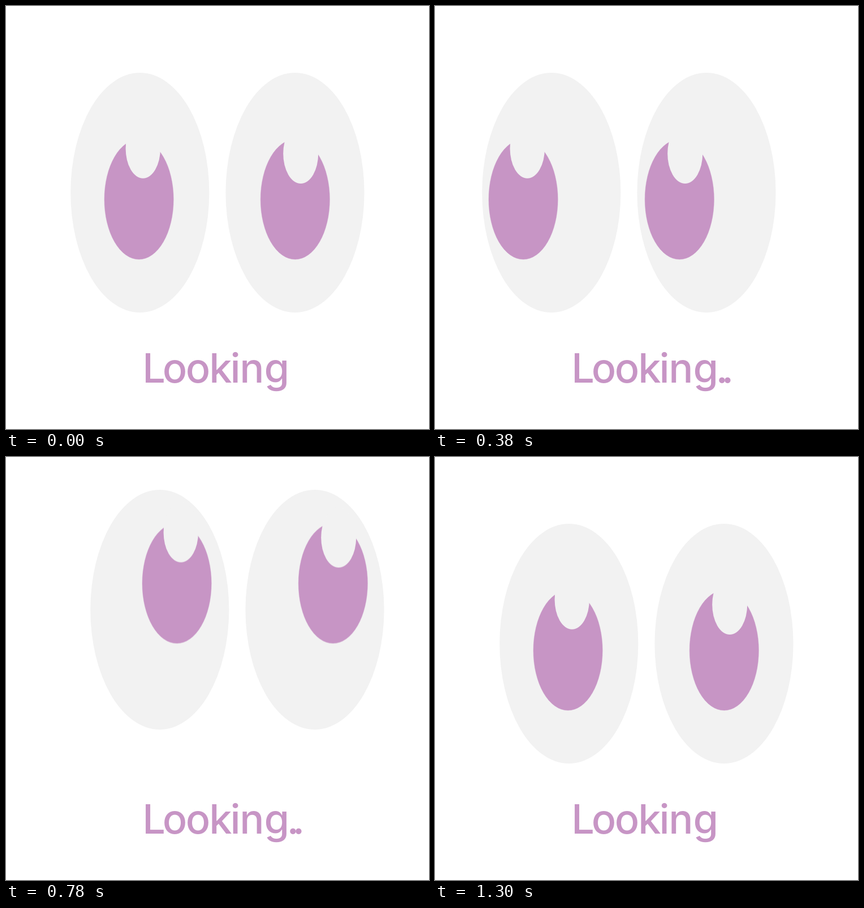
An HTML page for the animation above (1.5 s loop, 748 by 748 pixels).

```html
<!DOCTYPE html>
<html lang="en">
<head>
<meta charset="utf-8">
<title>Looking</title>
<style>
  html, body { margin: 0; width: 100%; height: 100%; overflow: hidden; background: #fff; }
  svg { display: block; width: 100vw; height: 100vh; }

  .white, .glint { fill: #f2f2f2; }
  .iris, text { fill: #c795c5; }
  .iris { stroke: #c795c5; stroke-opacity: .45; }
  text { font: 500 72px Inter, "Noto Sans", sans-serif; text-anchor: middle; }

  .eyes, .pupils, .dot { animation: 1.5s step-end infinite; }
  .eyes { animation-name: eyes; }
  .pupils { animation-name: pupils; }
  .d1 { animation-name: dot1; }
  .d2 { animation-name: dot2; }
  .d3 { animation-name: dot3; }

  @keyframes eyes {
    0%, 66.66%, 100% { transform: translate(0, 0); }
    6.66%  { transform: translate(-17.5px, 0); }
    13.33% { transform: translate(-31px, 0); }
    33.33% { transform: translate(0, -25px); }
    40%    { transform: translate(35px, -60px); }
    60%    { transform: translate(14.7px, -38px); }
  }
  @keyframes pupils {
    0%, 66.66%, 100% { transform: translate(0, 0); }
    6.66%  { transform: translate(-47px, 0); }
    13.33% { transform: translate(-79px, 0); }
    33.33% { transform: translate(-12px, -54px); }
    40%    { transform: translate(67px, -118.5px); }
    60%    { transform: translate(30.7px, -70px); }
  }
  @keyframes dot1 { 0%, 60%, 100% { opacity: 0; } 6.66% { opacity: 1; } }
  @keyframes dot2 { 0%, 60%, 100% { opacity: 0; } 13.33% { opacity: 1; } }
  @keyframes dot3 { 0%, 40%, 100% { opacity: 0; } 33.33% { opacity: 1; } }
</style>
</head>
<body>
<svg viewBox="0 0 748 748">
  <g class="eyes">
    <ellipse class="white" cx="236.8" cy="330" rx="122.6" ry="212"/>
    <ellipse class="white" cx="511" cy="330" rx="122.6" ry="212"/>
  </g>
  <g class="pupils">
    <ellipse class="iris" cx="235.1" cy="342" rx="61.1" ry="106"/>
    <ellipse class="glint" cx="242.3" cy="252" rx="30.7" ry="52.7"/>
    <ellipse class="iris" cx="511.3" cy="342" rx="61.1" ry="106"/>
    <ellipse class="glint" cx="521.2" cy="261" rx="31" ry="53"/>
  </g>
  <text y="666" x="261.5 298.5 339.5 379.5 405.5 435 478.8">Looking</text>
  <text class="dot d1" x="507.3" y="666">.</text>
  <text class="dot d2" x="517.3" y="666">.</text>
  <text class="dot d3" x="528" y="666">.</text>
</svg>
</body>
</html>
```
